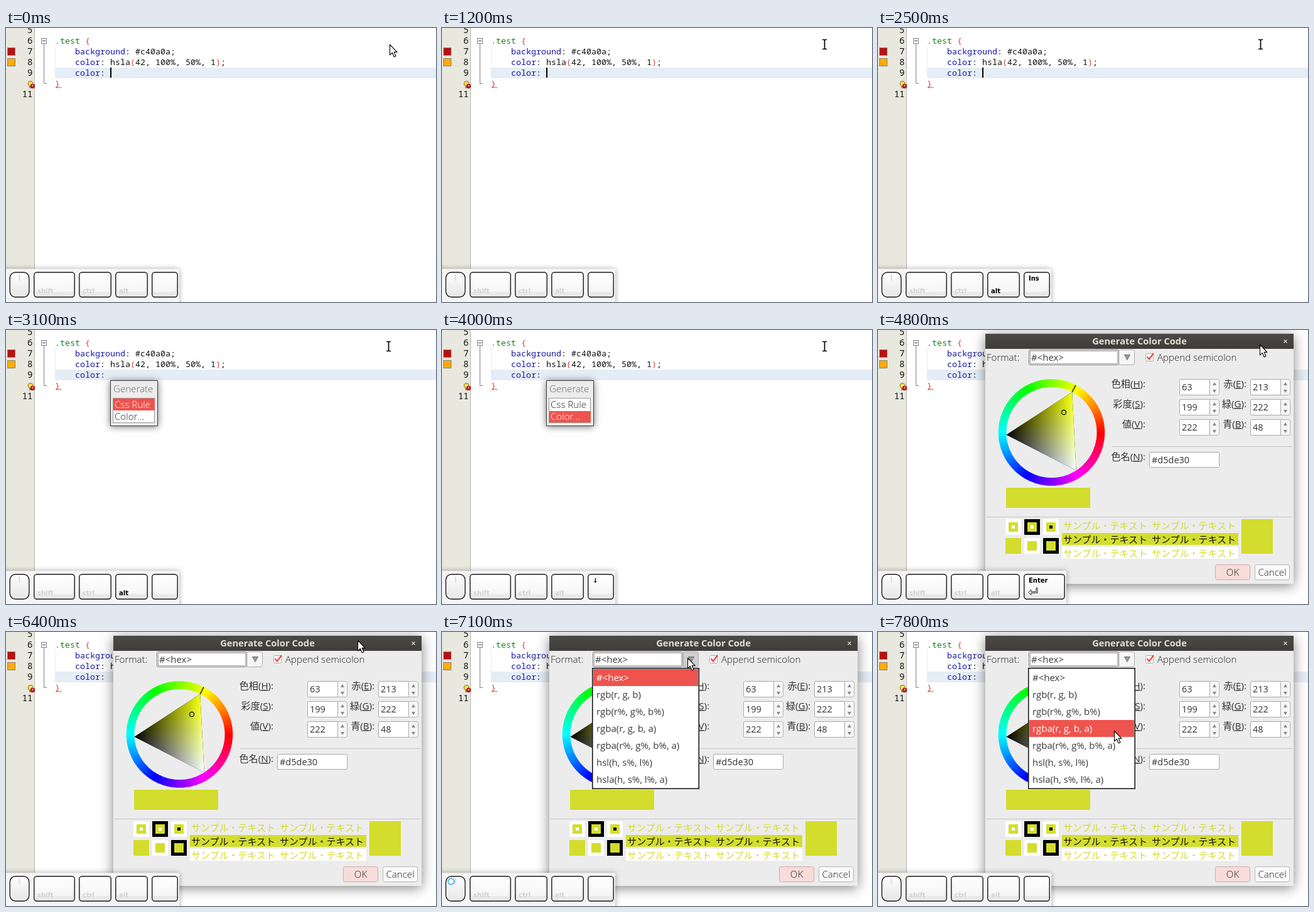
Write an HTML page that moves like this. It is 685x436 px and loops after 8000 ms.

```html
<!DOCTYPE html>
<html lang="ja">
<head>
<meta charset="utf-8">
<title>Color code generator</title>
<style>
html, body { margin: 0; width: 100%; height: 100%; overflow: hidden; background: #fff; }
svg { display: block; width: 685px; height: 436px; }
text { white-space: pre; }
.code { font: 13.33px "Noto Sans Mono", monospace; fill: #111; }
.line { font-size: 14px; }
.ui { font: 300 15.1px "Open Sans", "Noto Sans CJK JP", sans-serif; fill: #222; }
.item { font-weight: 400; font-size: 15px; fill: #3c3c3c; }
.num { font-size: 14.5px; font-weight: 400; fill: #333; }
.cjk { font-weight: 400; fill: #333; }
.sample { font-size: 15px; word-spacing: 3px; }
.key { font: bold 10px "DejaVu Sans", sans-serif; }
.u { text-decoration: underline; }
</style>
</head>
<body>
<svg id="stage" viewBox="0 0 685 436" xmlns="http://www.w3.org/2000/svg"></svg>
<script>
const LOOP = 8000;
const RED = '#ef534e', PICK = '#d3dd2e', FACE = '#ececec', FADED = '#d2d2d2';
const stage = document.getElementById('stage');
const $ = id => document.getElementById(id);

const rect = (x, y, w, h, fill, more = '') =>
  `<rect x="${x}" y="${y}" width="${w}" height="${h}" fill="${fill}" ${more}/>`;
const box = (x, y, w, h, fill, line, r = 0, more = '') =>
  rect(x + .5, y + .5, w - 1, h - 1, fill, `stroke="${line}" rx="${r}" ${more}`);
const text = (x, y, s, cls, more = '') => `<text x="${x}" y="${y}" class="${cls}" ${more}>${s}</text>`;
const path = (d, stroke, more = '') => `<path d="${d}" stroke="${stroke}" fill="none" ${more}/>`;
const group = (id, body) => `<g id="${id}">${body}</g>`;
const tint = (s, color) => `<tspan fill="${color}">${s}</tspan>`;
const esc = s => s.replace(/</g, '&lt;').replace(/>/g, '&gt;');
const polar = (deg, r) => {
  const a = deg * Math.PI / 180;
  return [276.5 + r * Math.cos(a), 163 - r * Math.sin(a)].map(v => +v.toFixed(2));
};
const mid = (p, q) => [(p[0] + q[0]) / 2, (p[1] + q[1]) / 2];

function gradient(id, from, to, a, b) {
  return `<linearGradient id="${id}" gradientUnits="userSpaceOnUse" x1="${from[0]}" y1="${from[1]}" x2="${to[0]}" y2="${to[1]}">
    <stop stop-color="${a}"/><stop offset="1" stop-color="${b}"/></linearGradient>`;
}

function shadow(id, blur, dy, alpha) {
  return `<filter id="${id}" x="-40%" y="-40%" width="180%" height="180%">
    <feDropShadow dx="0" dy="${dy}" stdDeviation="${blur}" flood-color="#000" flood-opacity="${alpha}"/></filter>`;
}

function editor() {
  const red = '#d04040', blue = '#1818a8';
  const rows = [
    tint('.test', '#17851d') + tint(' {', red),
    tint('    background', blue) + ': #c40a0a;',
    tint('    color', blue) + ': hsla' + tint('(', red) + '42, 100%, 50%, 1' + tint(')', red) + ';',
    tint('    color', blue) + ':',
    tint('}', red)
  ];
  let s = rect(0, 0, 685, 436, '#fff') + rect(79, 63, 606, 17, '#e5edf6') +
    rect(0, 0, 45, 436, '#e8e8df') + rect(45, 0, 1, 436, '#b4b4b4');
  rows.forEach((row, i) => s += text(78, 25 + 17 * i, row, 'code'));
  for (const n of [5, 6, 7, 8, 9, 11])
    s += text(42.5, 25 + 17 * (n - 6), n, 'code line', 'text-anchor="end"');
  s += path('M78.5 29V80', '#c4c4c4', 'stroke-dasharray="1 2"');
  s += path('M60.5 25V88.5H65', '#808080') + box(56, 16, 9, 9, '#fff', '#808080') + path('M58 20.5H63', '#444');
  s += box(2, 31, 13, 13, '#b9100f', '#8a8078') + box(2, 48, 13, 13, '#ffab0b', '#8a8078');
  s += path('M79 95l1.5-1.5 2 2 2-2 2 2 1.5-1.5', '#d02020');
  s += '<circle cx="39" cy="88.5" r="4" fill="#f6dc4e" stroke="#8d7420"/>' + rect(37, 92, 4, 4, '#9a8a5a') +
    '<circle cx="42.5" cy="92.5" r="3.4" fill="#d01818" stroke="#8e1010" stroke-width=".7"/>' +
    rect(42, 90.5, 1, 2.5, '#fff');
  return s;
}

function popup() {
  return box(166, 80, 76, 73, FACE, '#3a3a3a', 0, 'id="popFrame" filter="url(#popShadow)"') +
    text(171, 99, 'Generate', 'ui', 'style="fill:#666"') +
    box(170, 108, 67, 40, '#fff', '#9a9a9a') +
    rect(171, 109, 66, 19, RED, 'id="popRow"') +
    text(173, 124, 'Css Rule', 'ui', 'id="pop0"') + text(173, 143, 'Color...', 'ui', 'id="pop1"');
}

function wheel() {
  const hue = 63, [h, k, w] = [0, 120, 240].map(d => polar(hue + d, 72));
  const tri = `M${h}L${k}L${w}Z`;
  let s = '';
  for (let d = 0; d < 360; d += 3)
    s += path(`M${polar(d - 1.9, 78.4)}A78.4 78.4 0 0 0 ${polar(d + 1.9, 78.4)}`, `hsl(${d},100%,50%)`, 'stroke-width="12.6"');
  s += '<defs>' + gradient('shade', k, mid(h, w), '#000', '#f2ff00') +
    gradient('pale', mid(h, k), w, '#000', '#0d00ff') + '</defs>';
  s += `<g style="isolation:isolate"><path d="${tri}" fill="url(#shade)"/>` +
    `<path d="${tri}" fill="url(#pale)" style="mix-blend-mode:screen"/></g>`;
  s += path(`M${polar(hue, 72)}L${polar(hue, 84.5)}`, '#000', 'stroke-width="1.3"');
  return s + '<circle cx="296" cy="131" r="3.6" fill="none" stroke="#000" stroke-width="1.2"/>';
}

function spinner(x, y, value) {
  const c = x + 56;
  return box(x, y, 64, 26, '#f6f6f6', '#b3b3b3', 3) + box(x, y, 49, 26, '#fff', '#a9a9a9', 2) +
    text(x + 4, y + 18, value, 'ui num') +
    `<path d="M${c - 3} ${y + 10}h6l-3-5zM${c - 3} ${y + 17}h6l-3 5z" fill="#8a8a8a"/>`;
}

const label = (x, y, name, letter) =>
  text(x, y, `${name}(<tspan class="u">${letter}</tspan>):`, 'ui cjk', 'text-anchor="end"');

function preview() {
  const nested = (x, y, colors) => colors.map((c, i) => rect(x + 5 * i, y + 5 * i, 25 - 10 * i, 25 - 10 * i, c)).join('');
  const sample = 'サンプル・テキスト サンプル・テキスト';
  return nested(203, 301, ['#fff', PICK, '#fff']) + nested(233, 301, ['#000', PICK, '#fff']) +
    nested(263, 301, ['#fff', PICK, '#000']) + nested(203, 331, [PICK]) +
    nested(233, 331, ['#fff', PICK]) + nested(263, 331, ['#000', PICK]) +
    rect(293, 323, 281, 19, PICK) + rect(293, 345, 281, 19, '#fff') + rect(579, 301, 50, 55, PICK) +
    [PICK, '#111', PICK].map((c, i) => text(295, 317 + 22 * i, sample, 'ui cjk sample', `style="fill:${c}"`)).join('');
}

function dialog() {
  let s = rect(171, 6, 491, 398, FACE, 'rx="2" filter="url(#dlgShadow)"') +
    rect(171, 6, 491, 24, 'url(#bar)') +
    text(416.5, 23, 'Generate Color Code', 'ui', 'text-anchor="middle" style="font-weight:700;font-size:14.7px;fill:#e2ded5"') +
    path('M646.5 15.5l5 5m0-5l-5 5', '#dcd8d0', 'stroke-width="1.2"');
  s += text(173, 49, 'Format:', 'ui') +
    box(383, 31, 26, 25, '#f5f5f5', '#adadad', 3, 'id="drop"') + box(240, 31, 144, 25, '#fff', '#777', 2) +
    box(242, 33, 140, 21, 'none', '#333', 0, 'stroke-dasharray="1 1"') + text(244, 49, esc('#<hex>'), 'ui item') +
    '<path d="M392.5 39.5h9l-4.5 8z" fill="#9a9a9a" stroke="#707070"/>';
  s += box(426, 37, 13, 13, '#fff', '#a8a8a8', 2) + path('M428.5 42.5l3.5 4 7-9.5', '#e2473f', 'stroke-width="2.2"') +
    text(445, 49, 'Append semicolon', 'ui');
  s += wheel() + rect(204, 251, 134, 32, PICK);
  [['色相', 'H', 63, '赤', 'E', 213], ['彩度', 'S', 199, '緑', 'G', 222], ['値', 'V', 222, '青', 'B', 48]]
    .forEach(([a, ka, va, b, kb, vb], i) => {
      const y = 78 + 32 * i;
      s += label(426, y + 13, a, ka) + spinner(480, y, va) + label(587, y + 13, b, kb) + spinner(593, y, vb);
    });
  s += rect(373, 185, 287, 1, '#c6c6c6') + rect(173, 297, 487, 1, '#c6c6c6');
  s += label(426, 207, '色名', 'N') + box(432, 194, 112, 25, '#fff', '#a9a9a9', 2) + text(436, 212, '#d5de30', 'ui num');
  s += preview();
  s += box(537, 373, 56, 25, '#f8dcd9', '#d2aaa6', 3) + box(600, 373, 56, 25, '#f9f9f9', '#b5b5b5', 3) +
    text(565, 391, 'OK', 'ui', 'text-anchor="middle"') + text(628, 391, 'Cancel', 'ui', 'text-anchor="middle"');
  return s;
}

const formats = ['#<hex>', 'rgb(r, g, b)', 'rgb(r%, g%, b%)', 'rgba(r, g, b, a)',
  'rgba(r%, g%, b%, a)', 'hsl(h, s%, l%)', 'hsla(h, s%, l%, a)'];

function menu() {
  return rect(239.75, 57.75, 169.5, 191.5, '#fff', 'stroke="#111" stroke-width="1.5"') +
    rect(241, 59, 167, 27, RED, 'id="menuRow"') +
    formats.map((f, i) => text(246, 78 + 27 * i, esc(f), 'ui item', `id="fmt${i}"`)).join('');
}

const keyCap = (x, w, id = '') =>
  rect(x + .75, 388.75, w - 1.5, 39.5, 'url(#cap)', `rx="4.5" stroke="#1c1c1c" stroke-width="1.4" id="${id}"`) +
  rect(x + 4, 391, w - 8, 29, '#fff', `rx="3" opacity=".55" id="${id}Top"`);

function keys() {
  return rect(-8, 383.5, 284, 70, '#f5f5f5', 'id="panel" filter="url(#keyShadow)"') +
    rect(6.2, 388.7, 30.6, 39.6, 'url(#cap)', 'rx="9" stroke="#1c1c1c" stroke-width="1.4"') +
    path('M21.5 392V402', '#dcdcdc', 'stroke-width="2"') +
    '<circle id="click" cx="14.5" cy="397" r="4.8" fill="#eefaff" stroke="#3fb4e8" stroke-width="2.4" stroke-dasharray="2 .7"/>' +
    keyCap(44, 66) + keyCap(116, 52) + keyCap(174, 52) + keyCap(232, 42, 'last') +
    text(50, 422, 'shift', 'key', `fill="${FADED}"`) + text(122, 422, 'ctrl', 'key', `fill="${FADED}"`) +
    text(180, 422, 'alt', 'key', 'id="alt"') + text(240, 402, '', 'key', 'id="word"') +
    group('enterMark', path('M252 410.5v6h-8v-3l-4.5 4 4.5 4v-3h10v-8z', '#222'));
}

const beam = 'M-3.5 -7.5H-1L0 -6.5 1 -7.5H3.5M-3.5 7.5H-1L0 6.5 1 7.5H3.5M0 -6.5V6.5';

stage.innerHTML = '<defs>' + shadow('popShadow', 6, 1, .55) + shadow('dlgShadow', 10, 3, .5) + shadow('keyShadow', 4, 0, .35) +
  gradient('bar', [0, 6], [0, 30], '#4b4a47', '#3e3d3a') + gradient('cap', [0, 388], [0, 428], '#ffffff', '#e6e6e6') + '</defs>' +
  editor() + rect(166, 63, 2, 16, '#000', 'id="caret"') +
  group('popup', popup()) + group('dialog', dialog()) + group('menu', menu()) + group('keys', keys()) +
  group('arrow', '<path d="M.5 .5V17L4.4 13.4 7.2 20 10 18.8 7.2 12.4H12Z" fill="#fff" stroke="#111" stroke-width="1.2" stroke-linejoin="round"/>') +
  group('beam', path(beam, '#fff', 'stroke-width="4"') + path(beam, '#000', 'stroke-width="1.7"'));

// Pointer stops: time, x, y, shape
const pointer = [
  [0, 611, 26, 'arrow'], [200, 612, 29.5, 'beam'], [400, 611, 26, 'beam'], [600, 609.5, 26, 'beam'],
  [4700, 608, 23, 'arrow'], [6400, 560, 13, 'arrow'], [6500, 474, 22, 'arrow'], [6600, 408, 37, 'arrow'],
  [6700, 391, 41, 'arrow'], [7400, 391, 48, 'arrow'], [7500, 389, 72, 'arrow'], [7600, 385, 104, 'arrow'],
  [7700, 379, 138, 'arrow'], [7800, 376, 157, 'arrow']
];
const blinks = [200, 600, 900, 1200, 1500, 1900, 2100, 2400, 2700];

const within = (t, a, b) => t >= a && t < b;
const show = (id, on) => $(id).setAttribute('display', on ? 'inline' : 'none');
const set = (id, attrs) => { for (const k in attrs) $(id).setAttribute(k, attrs[k]); };
const ink = (id, on) => { $(id).style.fill = on ? '#fff' : ''; };

function draw(t) {
  const [, x, y, shape] = pointer.filter(p => p[0] <= t).pop();
  for (const id of ['arrow', 'beam']) {
    show(id, id === shape);
    set(id, { transform: `translate(${x} ${y})` });
  }
  show('caret', t < 2800 && blinks.filter(b => b <= t).length % 2 === 0);

  const easing = within(t, 2800, 2900) || t >= 4700;
  const second = t >= 4000;
  show('popup', within(t, 2800, 4800));
  set('popup', { opacity: t < 2900 ? .7 : 1 });
  set('popFrame', { y: easing ? 81.5 : 80.5, height: easing ? 70 : 72 });
  set('popRow', { y: second ? 129 : 109, height: second ? 18 : 19 });
  ink('pop0', !second);
  ink('pop1', second);

  show('dialog', t >= 4800);
  set('drop', { fill: within(t, 7000, 7200) ? '#cecece' : within(t, 6700, 7400) ? '#fcfcfc' : '#f5f5f5' });
  show('menu', t >= 7100);
  const row = Math.max(0, Math.min(6, Math.floor((y - 59) / 27)));
  set('menuRow', { y: 59 + 27 * row });
  formats.forEach((_, i) => ink('fmt' + i, i === row));

  const enter = within(t, 4700, 5200);
  const width = enter ? 66 : 42;
  set('panel', { width: width + 242 });
  set('last', { width: width - 1.5 });
  set('lastTop', { width: width - 8 });
  set('alt', { fill: within(t, 1900, 4000) ? '#000' : FADED });
  $('word').textContent = enter ? 'Enter' : within(t, 2500, 3100) ? 'Ins' : within(t, 4000, 4700) ? '↓' : '';
  show('enterMark', enter);
  show('click', within(t, 7000, 7400));
}

const start = performance.now();
function tick() {
  draw((performance.now() - start) % LOOP);
  requestAnimationFrame(tick);
}
tick();
</script>
</body>
</html>
```
